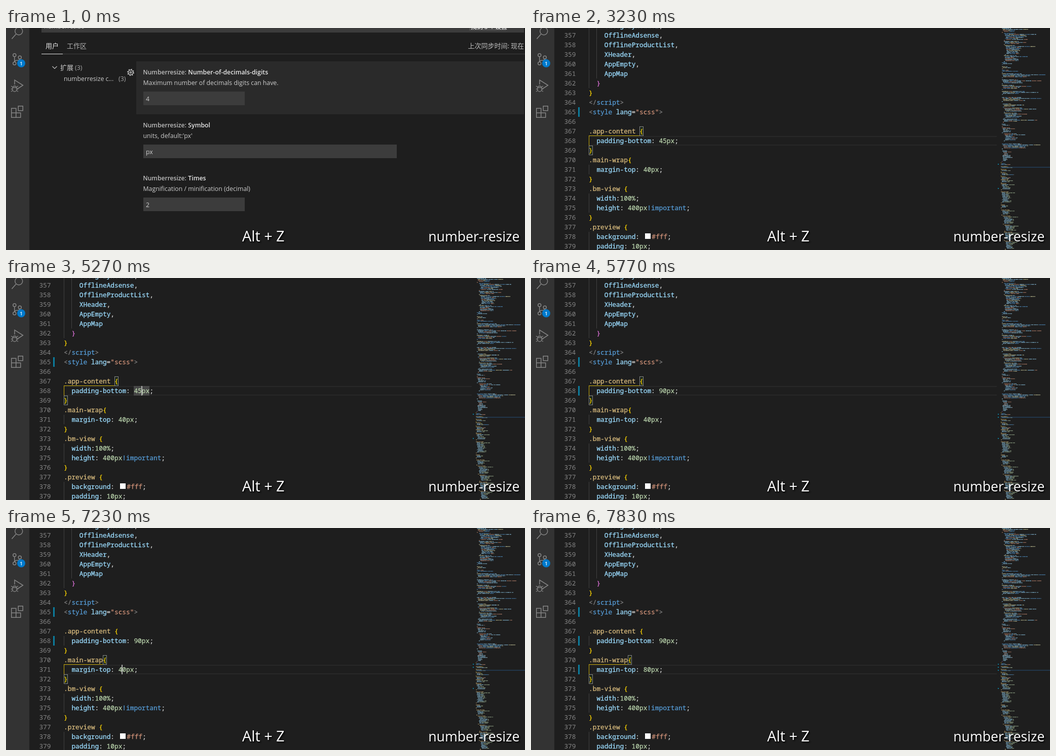
Animation, 1024 px wide and 440 px high, one loop 8 s. Source, as an HTML page with a canvas:

```html
<!DOCTYPE html>
<html lang="zh">
<head>
<meta charset="utf-8">
<title>number-resize</title>
<style>
html, body { margin: 0; height: 100%; overflow: hidden; background: #1e1e1e; }
canvas { display: block; }
</style>
</head>
<body>
<canvas id="stage" width="1024" height="440"></canvas>
<script>
const LOOP = 8000, CHAR = 7.69, LEFT = 114, ROW = 19, FIRST = 356;
const SANS = '"Open Sans", "Noto Sans CJK SC", sans-serif';
const CJK = '"Noto Sans CJK SC", "Noto Sans CJK", sans-serif';
const MONO = '12.83px "Noto Sans Mono", monospace';

const code = `    CategoryHeader,
    OfflineAdsense,
    OfflineProductList,
    XHeader,
    AppEmpty,
    AppMap
  }
}
</script\>
<style lang="scss">

.app-content {
  padding-bottom: 45px;
}
.main-wrap{
  margin-top: 40px;
}
.bm-view {
  width:100%;
  height: 400px!important;
}
.preview {
  background: #fff;
  padding: 10px;`.split('\n');

const syntax = [
  [/\s+/y, ''], [/<\/?|>/y, '#808080'], [/script|style/y, '#569cd6'],
  [/"[^"]*"|#\w+/y, '#ce9178'], [/!important/y, '#569cd6'],
  [/\.[a-z][\w-]*/y, '#d7ba7d'], [/\d[\w%]*/y, '#b5cea8'],
  [/[\w-]+/y, '#9cdcfe'], [/[{}]/y, '#ffd700'], [/./y, '#d4d4d4']
];

function tokens(line) {
  const list = [];
  for (let col = 0; col < line.length;) {
    for (const [pattern, color] of syntax) {
      pattern.lastIndex = col;
      const match = pattern.exec(line);
      if (!match) continue;
      const text = match[0];
      if (color) list.push({ text, col, color: text === '}' && col ? '#da70d6' : color });
      col += text.length;
      break;
    }
  }
  return list;
}

const canvas = document.getElementById('stage');
const ctx = canvas.getContext('2d');
const topOf = line => 214 + (line - 368) * ROW;
const mapY = line => 270 + (line - 365) * 2;

function rect(x, y, w, h, color) {
  ctx.fillStyle = color;
  ctx.fillRect(x, y, w, h);
}

function label(text, x, y, color = '#cccccc', font = '12.3px ' + SANS, align = 'left') {
  ctx.font = font;
  ctx.fillStyle = color;
  ctx.textAlign = align;
  ctx.fillText(text, x, y);
}

// Code text gets a hairline outline for crisp, solid stems
function codeText(text, x, y, color) {
  label(text, x, y, color, MONO);
  ctx.strokeStyle = color;
  ctx.lineWidth = .3;
  ctx.strokeText(text, x, y);
}

function stroke(path, color, width) {
  ctx.strokeStyle = color;
  ctx.lineWidth = width;
  ctx.stroke(new Path2D(path));
}

function circle(x, y, r, color, fill) {
  ctx.beginPath();
  ctx.arc(x, y, r, 0, 7);
  if (fill) { ctx.fillStyle = color; ctx.fill(); }
  else { ctx.strokeStyle = color; ctx.stroke(); }
}

// Minimap blocks: first y, rows, indent, longest row
const blocks = [
  [0, 5, 4, 50], [10, 8, 8, 62], [26, 4, 8, 42], [34, 10, 10, 58], [54, 7, 8, 46],
  [68, 3, 4, 18], [76, 3, 4, 16], [83, 3, 4, 30], [90, 5, 4, 84], [102, 5, 4, 76],
  [113, 5, 4, 56], [125, 4, 4, 70], [137, 5, 4, 76], [150, 4, 6, 40], [158, 5, 8, 62],
  [168, 6, 8, 44], [180, 4, 6, 66], [190, 3, 4, 14], [197, 6, 4, 24], [209, 8, 8, 40],
  [229, 6, 4, 74], [243, 6, 5, 16], [300, 4, 2, 22], [308, 7, 2, 25], [324, 12, 2, 26],
  [350, 4, 2, 12], [360, 6, 3, 24], [372, 9, 6, 28], [390, 7, 9, 26], [404, 9, 8, 28],
  [422, 9, 10, 24]
];

const minimap = document.createElement('canvas');
minimap.width = 97;
minimap.height = 440;

function buildMinimap() {
  const map = minimap.getContext('2d');
  let seed = 7;
  const random = () => (seed = seed * 16807 % 2147483647) / 2147483647;
  const dash = (x, y, text, color) => {
    map.fillStyle = color;
    for (let i = 0; i < text.length; i++) {
      const ink = .4 + random() * .4;
      map.globalAlpha = ink;
      map.fillRect(x + i, y, 1, 1);
      map.globalAlpha = ink * .3;
      map.fillRect(x + i, y + 1, 1, 1);
    }
  };
  for (const [y, rows, indent, longest] of blocks) {
    for (let r = 0; r < rows; r++) {
      const edge = r === 0 || r === rows - 1;
      const width = r === 1 ? longest : r === rows - 1 ? 2 : longest * (.35 + random() * .35);
      const start = edge ? Math.max(0, indent - 2) : indent + (r > 2 ? Math.floor(random() * 3) : 0);
      for (let x = 0; x < width;) {
        const size = Math.min(4 + Math.floor(random() * 12), Math.ceil(width - x));
        const color = y > 299 ? (edge ? '#d7ba7d' : x ? '#b5cea8' : '#9cdcfe')
          : ['#9cdcfe', '#9cdcfe', '#9cdcfe', '#dcdcaa', '#ce9178', '#569cd6'][Math.floor(random() * 6)];
        dash(start + x, y + r * 2, 'x'.repeat(size), color);
        x += size + 1;
      }
    }
  }
  code.forEach((line, i) => {
    for (const t of tokens(line)) dash(t.col, mapY(FIRST + i), t.text, t.color);
  });
}

function drawActivityBar() {
  const gray = '#858585';
  rect(0, 0, 46, 440, '#333333');
  ctx.lineWidth = 1.5;
  circle(25.25, 6.25, 7.5, gray);
  circle(16.8, 53.7, 3, gray);
  circle(27.3, 58.2, 3, gray);
  circle(16.8, 70.2, 3, gray);
  stroke('M19.6 12.2 L11.5 21.4 M16.8 57 V67 M27 61.5 Q26 64.2 23.5 64.2 H20.5 Q17.6 64.4 16.8 67', gray, 1.5);
  circle(30, 70, 8, '#007acc', true);
  label('1', 30, 73.5, '#ffffff', '600 9.5px ' + SANS, 'center');
  stroke('M17 112 V103 L33.5 113.5 L22 121', gray, 1.5);
  stroke('M13 119 a4 4 0 0 1 8 0 v3 a4 4 0 0 1 -8 0 z M13 118 h8 M10 115 l3 2 M24 115 l-3 2 M10 121 h3 M21 121 h3 M10 126 l3 -2 M24 126 l-3 -2', gray, 1.3);
  stroke('M24.25 154.75 h9 v9 h-9 z M10.75 159.25 h9 v18 h-9 z M10.75 168.25 h18 v9 h-9', gray, 1.5);
}

function drawSetting(y, name, note, value, width) {
  label('Numberresize:', 270.2, y + 26, '#bcbcbc', '600 12.1px ' + SANS);
  label(name, 359.3, y + 26, '#e7e7e7', '600 12.3px ' + SANS);
  label(note, 270.5, y + 47);
  rect(271, y + 60, width, 27, '#3c3c3c');
  label(value, 276, y + 79);
}

function drawSettings() {
  rect(70, 0, 952, 9, '#3c3c3c');
  label('numberresize', 75, 1);
  rect(914, 0, 73, 5, '#4d4d4d');
  label('找到 3 个设置', 917, 2, '#ffffff', '12px ' + CJK);
  label('用户', 78, 39.5, '#e7e7e7', '13px ' + CJK);
  label('工作区', 120, 39.5, '#b0b0b0', '13px ' + CJK);
  label('上次同步时间: 现在', 1022, 39.5, '#bdbdbd', '13px ' + CJK, 'right');
  rect(70, 51, 954, 1, '#414141');
  rect(70, 51, 42, 1, '#e7e7e7');

  stroke('M91.5 76 L96 80.5 L100.5 76', '#c5c5c5', 1.1);
  label('扩展', 107, 83, '#cccccc', '13px ' + CJK);
  label('(3)', 136, 83, '#a8a8a8');
  label('numberresize c...', 114, 105);
  label('(3)', 222, 105, '#a8a8a8');

  rect(257, 66, 765, 105, '#2a2a2a');
  ctx.lineWidth = 1.4;
  circle(246, 88, 4.6, '#c5c5c5');
  circle(246, 88, 1.6, '#c5c5c5');
  ctx.lineWidth = 2;
  ctx.setLineDash([2.2, 2.4]);
  circle(246, 88, 5.9, '#c5c5c5');
  ctx.setLineDash([]);

  drawSetting(66, 'Number-of-decimals-digits', 'Maximum number of decimals digits can have.', '4', 200);
  drawSetting(171, 'Symbol', "units, default:'px'", 'px', 500);
  drawSetting(276, 'Times', 'Magnification / minification (decimal)', '2', 200);
}

function bracket(line, col) {
  const x = Math.round(LEFT + col * CHAR), y = topOf(line);
  rect(x, y, 8, ROW, '#1b251b');
  ctx.strokeStyle = '#888888';
  ctx.lineWidth = 1;
  ctx.strokeRect(x + .5, y + .5, 7, ROW - 1);
}

function drawEditor(t) {
  const active = t < 7100 ? 368 : 371;
  const y = topOf(active);
  const marked = [365];
  if (t >= 5670) marked.push(368);
  if (t >= 7830) marked.push(371);

  rect(LEFT, y, 805, 2, '#282828');
  rect(LEFT, y + ROW - 2, 805, 2, '#282828');
  for (const line of [368, 371, 374, 375, 378, 379]) rect(LEFT, topOf(line), 1, ROW, '#404040');
  rect(LEFT, 0, 1, topOf(363), '#404040');
  rect(129, 0, 1, topOf(362), '#404040');

  const open = code[active - 1 - FIRST].indexOf('{');
  bracket(active - 1, open);
  bracket(active + 1, 0);
  rect(LEFT, y - 1, 1, ROW + 1, '#c7a908');
  rect(LEFT, y - 1, open * CHAR, 1, '#c7a908');

  if (t >= 4570 && t < 5430) rect(252, topOf(368), 31, ROW, 'rgba(87,87,87,.72)');
  if (t >= 7330 && t < 7630) rect(222, topOf(371), 31, ROW, 'rgba(87,87,87,.72)');

  code.forEach((source, i) => {
    const line = FIRST + i, base = topOf(line) + 14;
    let text = source, shift = 0;
    if (line === 368 && t >= 5430) text = text.replace('45', '90');
    if (line === 371 && t >= 7630) text = text.replace('40', '80');
    label(line, 88.5, base, '#858585', MONO, 'right');
    for (const token of tokens(text)) {
      if (token.text[0] === '#') {
        rect(225, base - 11, 11, 11, '#ffffff');
        shift = 16.6;
      }
      codeText(token.text, LEFT + token.col * CHAR + shift, base, token.color);
    }
  });

  ctx.drawImage(minimap, 927, 0);
  rect(927, mapY(active) - 1, 97, 2, 'rgba(38,79,120,.5)');
  for (const line of marked) {
    rect(93, topOf(line), 3, ROW, '#0c7d9d');
    rect(921, mapY(line) - 1, 2, 2, '#0c7d9d');
  }
  rect(921, 317, 2, 2, '#0c7d9d');

  const blink = active === 368
    ? t >= 4270 && Math.floor((t - 4270) / 500) % 2 === 0
    : t < 7630;
  if (blink) rect(active === 368 ? 267 : 228, y, 2, ROW, '#aeafad');
}

function drawCaptions() {
  ctx.save();
  ctx.shadowColor = '#000000';
  ctx.shadowBlur = 3;
  ctx.shadowOffsetX = ctx.shadowOffsetY = 2;
  label('Alt + Z', 466, 423, '#ffffff', '28.8px ' + SANS);
  label('number-resize', 833.3, 423, '#ffffff', '26.6px ' + SANS);
  ctx.restore();
}

function draw(now) {
  const t = now % LOOP;
  rect(0, 0, 1024, 440, '#1e1e1e');
  if (t < 3230) drawSettings();
  else drawEditor(t);
  drawActivityBar();
  drawCaptions();
  requestAnimationFrame(draw);
}

buildMinimap();
draw(performance.now());
</script>
</body>
</html>
```
